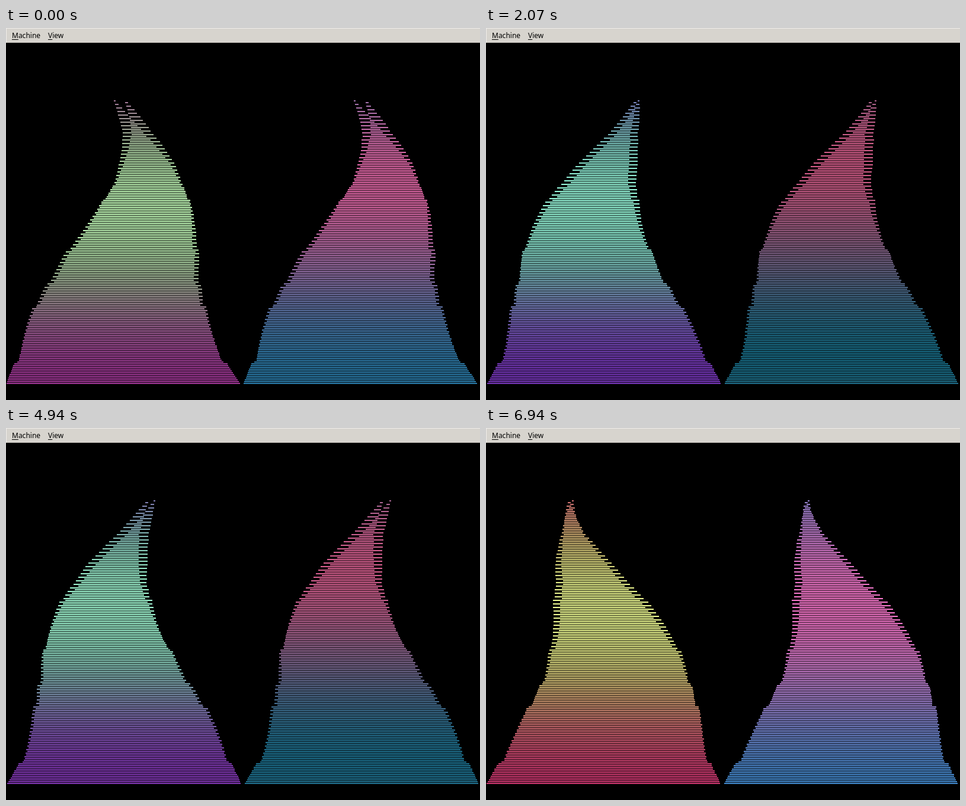
An HTML page with a canvas that plays this animation: 800x628 px, repeating every 6980 ms.

```html
<!DOCTYPE html>
<html lang="en">
<head>
<meta charset="utf-8">
<title>Swaying cones</title>
<style>
  html, body { margin: 0; width: 100%; height: 100%; overflow: hidden; background: #000; }
  canvas { position: absolute; left: 0; top: 0; display: block; }
  nav {
    position: absolute; left: 0; top: 0; width: 800px; height: 25px; box-sizing: border-box;
    background: #d7d4ce; color: #000;
    border-top: 1px solid #efedea; border-left: 1px solid #efedea;
    border-bottom: 1px solid #c4c1ba;
    font: 12px/24px "Noto Sans", "Open Sans", sans-serif;
  }
  nav span { position: absolute; top: 0; white-space: pre; }
  nav u { text-underline-offset: 2px; text-decoration-thickness: 1px; text-decoration-skip-ink: none; }
</style>
</head>
<body>
<canvas id="stage" width="800" height="628"></canvas>
<nav>
  <span style="left:9px"><u>M</u>achine</span>
  <span style="left:70px"><u>V</u>iew</span>
</nav>
<script>
const ctx = document.getElementById('stage').getContext('2d');

const LOOP = 6980, STEP = 33.4, PERIOD = 3020;
const TOP = 122, ROWS = 160, PITCH = 3;
const WAVE = 600;    // wavelength down the cone, px
const SPLIT = 15;    // even rows lead and odd rows trail by this much

// Cone width by height: a straight cone with small ledges.
const WIDTH = [[122, 3], [160, 25], [180, 38], [190, 50], [200, 58], [230, 88], [265, 114],
  [268, 121], [287, 138], [290, 147], [372, 207], [375, 218], [427, 242], [435, 258],
  [467, 276], [471, 290], [562, 343], [565, 359], [600, 395]];

const bell = (y, peak, half) => Math.cos(Math.PI * (y - peak) / half);

// Row colours: one channel follows the height, the others follow the swing s (-1 to 1).
function limeToRose(y, s) {
  const c = bell(y, 303 + 8 * s, 295);
  const glow = 35 * Math.max(0, c) ** 2;
  return [162 + 46 * s + glow, 155 + 100 * c, 152 - 40 * s + glow];
}

function pinkToTeal(y, s) {
  const c = bell(y, 262 + 37 * s, 330);
  return [138 + 20 * s + 95 * c, 116 + 14 * s - 9 * c, 172 + 36 * s];
}

const CONES = [
  { x: 198.5, lag: 0, colour: limeToRose },
  { x: 599, lag: 8, colour: pinkToTeal }
];

function widthAt(y) {
  let i = 0;
  while (i < WIDTH.length - 2 && y >= WIDTH[i + 1][0]) i++;
  const [[y0, w0], [y1, w1]] = [WIDTH[i], WIDTH[i + 1]];
  return w0 + (w1 - w0) * (y - y0) / (y1 - y0);
}

function drawCone(cone, turns) {
  const swing = Math.cos(2 * Math.PI * (turns - 0.25));
  for (let i = 0; i < ROWS; i++) {
    const y = TOP + i * PITCH;
    const crest = 282 + turns * WAVE - cone.lag + (i % 2 ? -SPLIT : SPLIT);
    const sway = 0.123 * (607 - y) * Math.cos(2 * Math.PI * (y - crest) / WAVE);
    const w = widthAt(y);
    ctx.fillStyle = `rgb(${cone.colour(y, swing).map(Math.round).join()})`;
    ctx.fillRect(Math.round(cone.x + sway - w / 2), y, Math.round(w), 2);
  }
}

const start = performance.now();
function frame() {
  const t = (performance.now() - start) % LOOP;
  const turns = Math.floor(t / STEP) * STEP / PERIOD;
  ctx.fillStyle = '#000';
  ctx.fillRect(0, 0, 800, 628);
  for (const cone of CONES) drawCone(cone, turns);
  requestAnimationFrame(frame);
}
frame();
</script>
</body>
</html>
```
